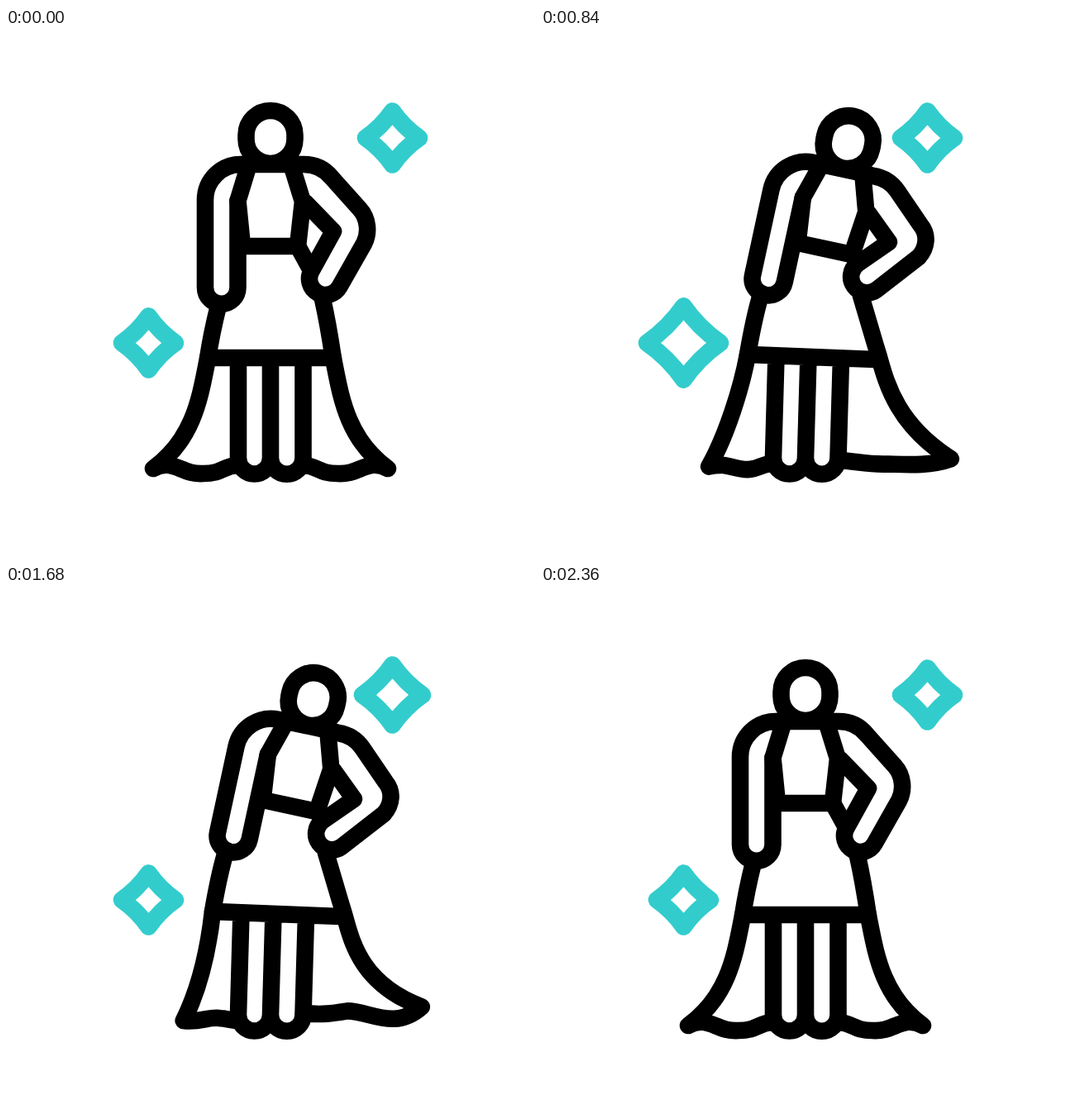
An HTML page for the animation above (2520 ms loop, 640 by 640 pixels).

```html
<!DOCTYPE html>
<html>
<head>
<meta charset="utf-8">
<style>
  html, body { margin: 0; width: 100%; height: 100%; overflow: hidden; background: #fff; }
  svg { display: block; width: 100%; height: 100%; }
  path { fill: none; stroke: #000; stroke-width: 20.6; stroke-linejoin: round; stroke-linecap: round; }
  .star { stroke: #33cccc; }
</style>
</head>
<body>
<svg viewBox="0 0 640 640">
  <path id="skirt"/>
  <path id="legs"/>
  <g id="torso">
    <path d="M290.5 129.5a29.5 29.5 0 0 1 59 0v5a29.5 29.5 0 0 1 -59 0z"/>
    <path d="M352 165H284A43 43 0 0 0 241 208V314a19.75 19.75 0 0 0 39.5 0V209L293 168"/>
    <path d="M280.5 209L286 264H353L359 210L346 168"/>
  </g>
  <path id="arm"/>
  <path id="leftStar" class="star" transform="translate(172.5 381)"/>
  <path id="rightStar" class="star" transform="translate(467.5 133)"/>
</svg>
<script>
const LOOP = 2520, STEP = 40, LAST = 2360;
const el = id => document.getElementById(id);

// Poses of the flexible parts: upright, leaning, and (skirt only) swung back.
// The hand's radius is small on purpose: it grows to a half circle.
const arm = [
  'M352 165L360 165C375 165 386 171 394 181L428 219C438 230 440 248 433 261L403.5 313A9 9 0 0 1 369.5 294L396 246L362 211M353 264L369.5 294',
  'M394 177L402 179C415 181 424 187 431 197L459 238C469 250 467 266 457 277L406 316.6A9 9 0 0 1 383 285.4L421 259L396 224M376.6 274L383 285.4'
];
const legs = [
  'M244 399L396 399M281 399L281 520A19.5 19.5 0 0 0 320 520L320 399M320 520A19.5 19.5 0 0 0 359.5 520L359.5 399',
  'M250 395L404 401M284.5 397L281 520A19.5 19.5 0 0 0 320 520L323.5 398M320 520A19.5 19.5 0 0 0 359.5 520L363 400'
];
const skirt = [
  'M257 336C252 356 247 380 244 400C235 445 228 497 178 533C203 520 212 541 239 539C262 539 262 530 280 529' +
  'M383 328C388 350 393 380 396 400C405 445 412 497 462 533C437 520 428 541 401 539C378 539 378 530 360 529',
  'M265 326C258 350 254 372 250 395C245 440 236 485 215 527C235 530 247 521 260 524C266 524 272 527 280 527' +
  'M387 324C396 355 402 375 409 398C418 430 428 482 503 510C470 540 440 515 413 515C395 518 385 520 360 518',
  'M265 326C258 350 254 372 250 395C241 432 216 500 195 533C222 522 220 543 243 541C260 541 265 527 280 527' +
  'M387 324C396 355 402 375 409 398C418 430 432 478 491 529C470 524 440 537 425 536C400 536 385 528 360 526'
];

const number = /-?\d+(\.\d+)?/g;
function mix(a, b, k) {
  const target = b.match(number);
  let i = 0;
  return a.replace(number, n => +(+n + (target[i++] - n) * k).toFixed(2));
}

// Smooth 0..1 ramp; a power above 1 delays the start
function ramp(t, from, to, power = 1) {
  const u = Math.min(1, Math.max(0, (t - from) / (to - from))) ** power;
  return u * u * (3 - 2 * u);
}

function star(id, size) {
  const c = size * 0.41;
  el(id).setAttribute('d',
    `M0 ${-size}Q${c} ${-c} ${size} 0Q${c} ${c} 0 ${size}Q${-c} ${c} ${-size} 0Q${-c} ${-c} 0 ${-size}z`);
}

function draw(t) {
  const rise = ramp(t, 0, 560, 2.3);
  const lean = rise - ramp(t, 1680, 2320, 1.8);
  const drape = rise - ramp(t, 1680, 2300, 2.3);
  const flutter = t > 700 && t < 1700 ? Math.sin(Math.PI * (t - 1200) / 500) ** 2 : 0;

  el('torso').setAttribute('transform', `rotate(${12.2 * lean} 317 377)`);
  el('arm').setAttribute('d', mix(...arm, lean));
  el('legs').setAttribute('d', mix(...legs, lean));
  el('skirt').setAttribute('d', mix(skirt[0], mix(skirt[1], skirt[2], flutter), drape));

  star('leftStar', 32.5 + 23 * (ramp(t, 0, 560) - ramp(t, 560, 1140)));
  star('rightStar', 32.5 + 21 * (ramp(t, 840, 1270) - ramp(t, 1270, 1840)));
}

const start = performance.now();
function tick() {
  const t = (performance.now() - start) % LOOP;
  draw(Math.min(LAST, Math.floor(t / STEP) * STEP));
  requestAnimationFrame(tick);
}
tick();
</script>
</body>
</html>
```
